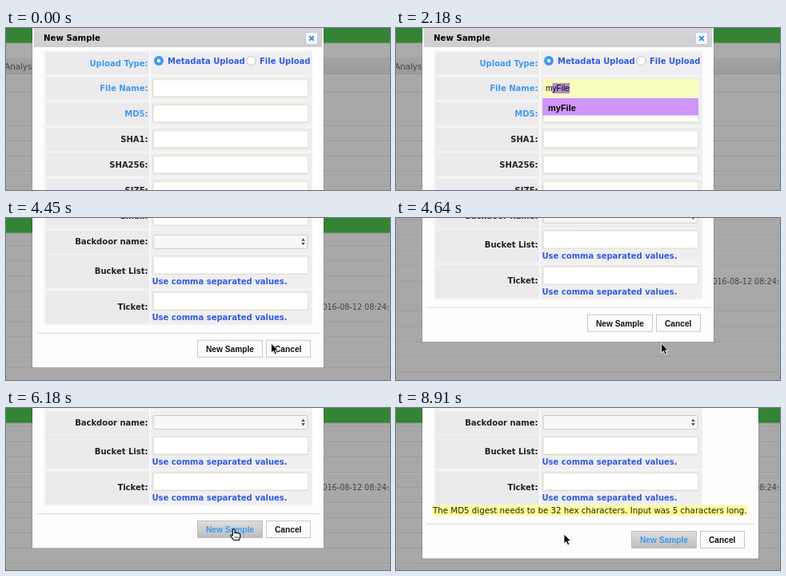
An HTML page for the animation above (8960 ms loop, 480 by 203 pixels).

```html
<!DOCTYPE html>
<html lang="en">
<head>
<meta charset="utf-8">
<title>New Sample form</title>
<style>
  html, body { margin: 0; width: 100%; height: 100%; overflow: hidden; background: #a8a8a8; }
  svg { display: block; width: 100%; height: 100%; }
  text { font: 10.26px "DejaVu Sans", Verdana, sans-serif; fill: #222; white-space: pre; }
  .b { font-size: 10px; font-weight: bold; }
  .link { fill: #4199f0; }
  .hint { fill: #2f5be6; }
  .end { text-anchor: end; }
  .ui { font: 10.2px "Liberation Sans", Arial, sans-serif; fill: #000; }
  .btn text { font: bold 10.2px "Liberation Sans", Arial, sans-serif; fill: #111; }
  .btn rect { fill: #fbfbfb; stroke: #c6c6c6; }
  .btn.hot rect { fill: url(#hot); stroke: #bdbdbd; }
  .btn.hot text { fill: #3d98f0; }
  .opt { font: bold 11px "Liberation Sans", Arial, sans-serif; fill: #000; }
  .dim { fill: #444; }
</style>
</head>
<body>
<svg viewBox="0 0 480 203" preserveAspectRatio="none">
  <defs>
    <linearGradient id="bar" x2="0" y2="1"><stop stop-color="#d9d7d9"/><stop offset="1" stop-color="#d0ced0"/></linearGradient>
    <linearGradient id="hot" x2="0" y2="1"><stop stop-color="#dedede"/><stop offset="1" stop-color="#bcbcbc"/></linearGradient>
    <linearGradient id="tabs" x2="0" y2="1"><stop stop-color="#a3a3a3"/><stop offset="1" stop-color="#9b9b9b"/></linearGradient>
  </defs>
  <rect width="480" height="203" fill="#a8a8a8"/>
  <g id="page"></g>
  <g id="header">
    <rect y="-60" width="480" height="79" fill="#348336"/>
    <rect y="18.5" width="480" height="1" fill="#8fa08f"/>
  </g>
  <g id="dialog">
    <rect id="shade" x="32" y="-9" fill="#000" opacity=".1"/>
    <rect id="panel" x="33" y="-8" fill="#fdfdfd"/>
    <g id="form"></g>
    <g id="foot"></g>
  </g>
  <g id="arrow">
    <path d="M0 0V12L2.8 9.5L4.7 14L6.9 13L5 8.8H8.8Z" fill="#000" stroke="#fff" stroke-width=".9"/>
  </g>
  <g id="hand">
    <path d="M-1.6 1Q-.3-.8 1 1V5Q2.2 4 3.2 5.2Q4.6 4.4 5.4 5.7Q7.6 5 7.7 7.2V10L6.5 14H-.3L-3.9 9.2Q-4.4 7.2-2.6 7.2L-1.6 8Z" fill="#fff" stroke="#000" stroke-width="1.1"/>
    <path d="M1.2 9.5V12M3.2 9.5V12M5.1 9.5V12" stroke="#000" stroke-width=".7"/>
  </g>
</svg>
<script>
const LOOP = 8960, SCROLL = 441, OVER = 20.5, PITCH = 32;
const $ = id => document.getElementById(id);
const rect = (x, y, w, h, fill, extra = '') =>
  `<rect x="${x}" y="${y}" width="${w}" height="${h}" fill="${fill}" ${extra}/>`;
const text = (x, y, s, cls = '', id = '') => `<text x="${x}" y="${y}" class="${cls}" id="${id}">${s}</text>`;

const cells = (y, h) =>
  rect(48, y - 1, 334.5, h + 2, '#fafafa', 'stroke="#dcdcdc" stroke-width=".7" stroke-dasharray="1 1"') +
  rect(49.5, y, 129.5, h, '#ebeaec') + rect(181, y, 201, h, '#efeef0');

const input = (y, id = '') =>
  `<g id="${id}">` + rect(183.5, y, 194.5, 22.5, '#fff', 'class="box" stroke="#dddacb" rx="1"') +
  rect(184.5, y + 1, 192.5, 20.5, 'none', 'class="glow" stroke="#f2f0e2"') + '</g>';

const select = y => rect(184, y, 193, 17, '#f7f7f7', 'stroke="#cbcbcb" rx="2"') +
  `<path d="M369.2 ${y + 7.5}l2.3-3.6 2.3 3.6zM369.2 ${y + 9.5}l2.3 3.6 2.3-3.6z" fill="#555"/>`;

const radio = (x, on) => on
  ? `<circle cx="${x}" cy="41" r="6" fill="#3f97ee"/><circle cx="${x}" cy="41" r="2.2" fill="#fff"/>`
  : `<circle cx="${x}" cy="41" r="5.7" fill="#fff" stroke="#b9b9b9" stroke-width=".9"/>`;

const button = (id, x, w, label) => `<g id="${id}" class="btn">` +
  rect(x + .5, 141.5, w, 21, '#fbfbfb') + text(x + 11, 156, label) + '</g>';

function buildPage() {
  let s = rect(0, 19, 480, 18, '#ababab') + rect(0, 37, 480, 20, 'url(#tabs)') +
    rect(0, 57, 480, 1, '#939393') + rect(0, 79.5, 480, 1, '#999') + text(-1.8, 52, 'Analysis', 'dim');
  for (let y = 122; y < SCROLL + 240; y += 19)
    s += rect(0, y, 480, 1, '#999') + rect(0, y + 1, 480, 1, '#aeaeae');
  s += `<text x="479" y="${SCROLL + 103.5}" class="dim end" style="font-size:9.6px">2016-08-12 08:24:</text>`;
  $('page').innerHTML = s;
}

function buildForm() {
  const names = ['File Name', 'MD5', 'SHA1', 'SHA256', 'SIZE', 'MIMETYPE', 'Campaign',
    'Confidence', 'Source', 'Method', 'Reference', 'Email', 'Backdoor name'];
  const lists = [6, 7, 8, 12];
  let s = rect(35, -6, 360, 30, 'url(#bar)', 'id="title"') +
    `<text x="47" y="16.3" class="b" style="font-size:10.2px;fill:#000">New Sample</text>` +
    rect(374.5, 5.5, 15, 15, '#f6f9fc', 'stroke="#b9cfe2" rx="2"') +
    '<path d="M379.3 10.3l5.4 5.4m0-5.4l-5.4 5.4" stroke="#3a8fdd" stroke-width="2"/>' +
    cells(30, 28) + text(177.5, 48, 'Upload Type:', 'b link end') +
    radio(191, true) + text(202, 45, 'Metadata Upload', 'b hint') +
    radio(306.5, false) + text(317, 45, 'File Upload', 'b hint');
  names.forEach((name, i) => {
    const y = 61 + i * PITCH;
    s += cells(y, 29) + text(177.5, y + 17.7, name + ':', 'b end' + (i < 2 ? ' link' : '')) +
      (lists.includes(i) ? select(y + 5.5) : input(y + 3, 'in' + i));
  });
  ['Bucket List', 'Ticket'].forEach((name, i) => {
    const y = SCROLL + 34 + i * 45;
    s += cells(y, 42) + text(177.5, y + 23.8, name + ':', 'b end') + input(y + 2) +
      text(182.5, y + 37.3, 'Use comma separated values.', 'b hint');
  });
  s += rect(195.3, 69, 22, 13, '#b48ccf', 'id="sel"') +
    text(187, 79, '', 'ui', 'val0') + text(187, 111, '', 'ui', 'val1') +
    rect(187, 0, .8, 12, '#777', 'id="caret"') +
    `<g id="drop">${rect(183, 88, 195, 21.5, '#cf95f8')}${text(190, 103.5, '', 'opt', 'pick')}</g>`;
  $('form').innerHTML = s;
  $('foot').innerHTML =
    rect(46, SCROLL + 122, 83, 13, '#fdfc94', 'id="mark"') + text(46, SCROLL + 132, '', '', 'note') +
    `<g id="acts">${rect(38, 132, 355, 1, '#d9d9d9', 'id="rule"')}` +
    `<g id="btns">${button('send', 239, 81, 'New Sample')}${button('cancel', 325, 55, 'Cancel')}</g></g>`;
}

const clamp = v => Math.min(1, Math.max(0, v));
const ease = v => { v = clamp(v); return v * v * (3 - 2 * v); };
const set = (id, attrs) => { for (const k in attrs) $(id).setAttribute(k, attrs[k]); };
const show = (id, on) => set(id, { visibility: on ? 'visible' : 'hidden' });
const move = (id, x, y) => set(id, { transform: `translate(${x} ${y})` });

// Runs past the end of the page, then springs back
function scrollAt(t) {
  if (t < 4640) return (SCROLL + OVER) * ease((t - 3730) / 860);
  return SCROLL + OVER * Math.exp((4640 - t) / 137);
}

function pointerAt(t) {
  const a = ease((t - 5100) / 380), b = ease((t - 8150) / 480);
  return [331.5 - 46.5 * a - 75 * b, 157 - 5.5 * a + 6.5 * b];
}

// Text, suggestion and focus of the two filled fields
function drawFields(t) {
  const focus = t < 300 || t >= 3730 ? -1 : t < 2480 ? 0 : t < 3350 ? 1 : 2;
  const since = t - [300, 2480, 3350][focus];
  const filled = [t >= 750, t >= 2900];
  const values = ['myFile', '12334'];
  const open = focus >= 0 && focus < 2 && filled[focus];
  for (let i = 0; i < 3; i++) {
    const on = i === focus, full = filled[i];
    const box = $('in' + i).querySelector('.box'), glow = $('in' + i).querySelector('.glow');
    box.setAttribute('fill', full ? '#f9fdbb' : '#fff');
    box.setAttribute('stroke', full ? '#f4f6c6' : on ? '#c6cee2' : '#dddacb');
    glow.setAttribute('stroke', full ? '#f9fdbb' : on ? '#e4e9f4' : '#f2f0e2');
    if (i < 2) $('val' + i).textContent = full ? values[i] : '';
  }
  show('sel', open);
  show('drop', open);
  if (open) {
    $('pick').textContent = values[focus];
    move('drop', 0, focus * PITCH);
    set('sel', focus ? { x: 192.7, y: 101, width: 22.7 } : { x: 195.5, y: 69, width: 21.7 });
  }
  show('caret', focus >= 0 && !open && since % 1000 < 500);
  set('caret', { y: 69 + Math.max(focus, 0) * PITCH });
}

function draw(t) {
  const scroll = scrollAt(t), over = Math.max(0, scroll - SCROLL);
  const note = t < 6700 ? '' : t < 7800 ? 'Uploading File...'
    : 'The MD5 digest needs to be 32 hex characters. Input was 5 characters long.';
  const drop = note ? 13 : 0, wide = t >= 7800 ? 56 : 0;
  const bottom = SCROLL + 175.5 + drop;

  move('page', 0, -scroll);
  move('dialog', 0, -scroll);
  move('header', 0, -over);
  set('panel', { width: 364 + wide, height: bottom + 8 });
  set('shade', { width: 366 + wide, height: bottom + 10 });
  set('title', { width: 360 + wide });
  set('rule', { width: 355 + wide });
  $('note').textContent = note;
  show('mark', note);
  set('mark', { width: wide ? 393 : 83 });
  move('acts', 0, SCROLL + drop);
  move('btns', wide ? 55 : 0, 0);
  drawFields(t);

  const [x, y] = pointerAt(t);
  const top = SCROLL + 141 + drop - scroll, shift = wide ? 55 : 0;
  const settled = t >= 4640;
  const inside = (left, w) =>
    settled && x >= left + shift && x <= left + shift + w && y >= top && y <= top + 22;
  const onSend = inside(239, 81), onCancel = inside(325, 55);
  const visible = t >= 3730, hand = onSend || onCancel;
  $('send').classList.toggle('hot', onSend || t >= 6600);
  $('cancel').classList.toggle('hot', onCancel);
  move('arrow', x, y);
  move('hand', x, y);
  show('arrow', visible && !hand);
  show('hand', hand);
}

buildPage();
buildForm();
const start = performance.now();
function tick() {
  draw((performance.now() - start) % LOOP);
  requestAnimationFrame(tick);
}
tick();
</script>
</body>
</html>
```
